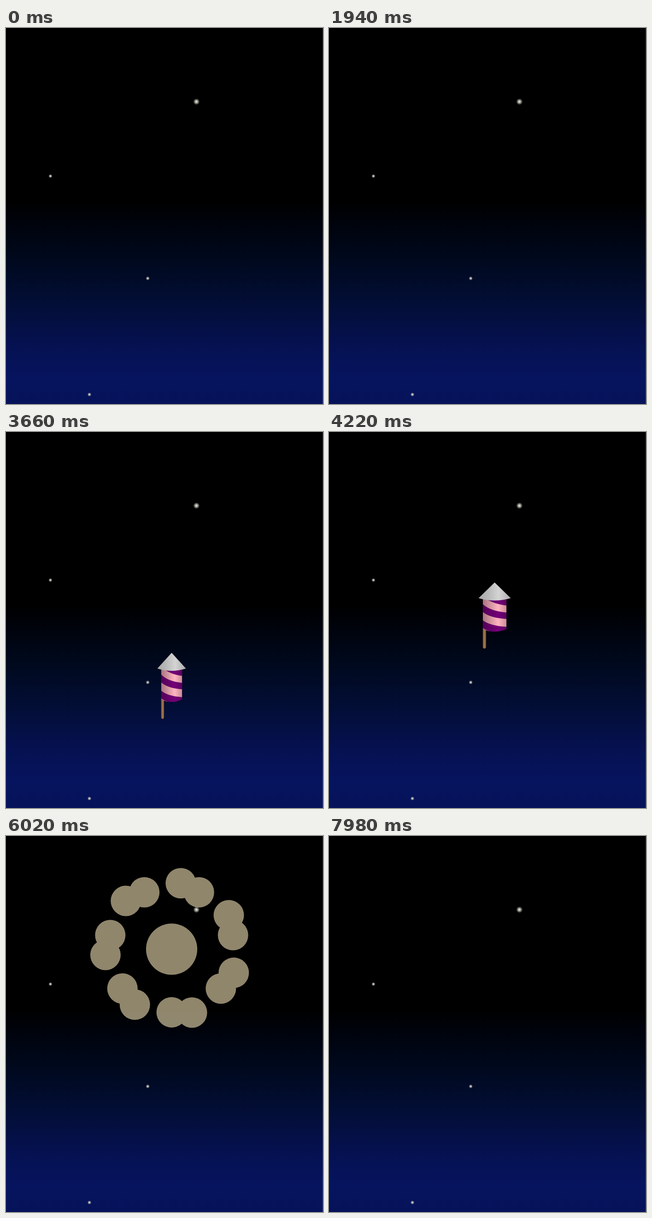
Write an HTML page that moves like this. It is 688 px wide and 814 px high and loops after 8 s.

```html
<!DOCTYPE html>
<html lang="en">
<head>
<meta charset="utf-8">
<title>Rocket at night</title>
<style>
  html, body { margin: 0; width: 100%; height: 100%; overflow: hidden; background: #000; }
  svg { display: block; width: 100%; height: 100%; }
</style>
</head>
<body>
<svg viewBox="0 0 688 814">
  <defs>
    <linearGradient id="sky" x1="0" y1="0" x2="0" y2="814" gradientUnits="userSpaceOnUse">
      <stop offset=".46" stop-color="#000"/>
      <stop offset=".52" stop-color="#00030c"/>
      <stop offset=".62" stop-color="#00091e"/>
      <stop offset=".74" stop-color="#030e38"/>
      <stop offset=".84" stop-color="#051150"/>
      <stop offset=".93" stop-color="#06145f"/>
      <stop offset="1" stop-color="#06135a"/>
    </linearGradient>
    <radialGradient id="glow">
      <stop offset="0" stop-color="#fafaf0"/>
      <stop offset=".35" stop-color="#d0d0c4" stop-opacity=".85"/>
      <stop offset=".75" stop-color="#a4a498" stop-opacity=".45"/>
      <stop offset="1" stop-color="#909088" stop-opacity="0"/>
    </radialGradient>
    <linearGradient id="cone">
      <stop offset="0" stop-color="#a8a8a8"/>
      <stop offset=".3" stop-color="#b8b8b8"/>
      <stop offset=".62" stop-color="#d4d4d4"/>
      <stop offset="1" stop-color="#acacac"/>
    </linearGradient>
    <linearGradient id="pink" x1="-27.5" x2="27.5" y1="0" y2="0" gradientUnits="userSpaceOnUse">
      <stop offset="0" stop-color="#a87480"/>
      <stop offset=".65" stop-color="#ffb4c0"/>
      <stop offset="1" stop-color="#cc8a96"/>
    </linearGradient>
    <linearGradient id="purple">
      <stop offset="0" stop-color="#540058"/>
      <stop offset=".65" stop-color="#740078"/>
      <stop offset="1" stop-color="#5c0060"/>
    </linearGradient>
    <linearGradient id="wood">
      <stop offset="0" stop-color="#80562f"/>
      <stop offset=".5" stop-color="#a8764c"/>
      <stop offset="1" stop-color="#80562f"/>
    </linearGradient>
    <path id="tube" d="M-27.5 32V101Q0 112 27.5 101V32Z"/>
    <clipPath id="inTube"><use href="#tube"/></clipPath>
  </defs>

  <rect width="688" height="814" fill="url(#sky)"/>
  <rect x="687" width="1" height="814" fill="#fff" opacity=".2"/>
  <g id="stars" fill="url(#glow)"></g>

  <g id="rocket">
    <rect x="-27.5" y="94" width="7.5" height="49" rx="3.75" fill="url(#wood)"/>
    <use href="#tube" fill="url(#purple)"/>
    <g clip-path="url(#inTube)" fill="url(#pink)">
      <path d="M-27.5 30Q-8 46 27.5 50V65Q-10 62 -27.5 47Z"/>
      <path d="M-27.5 64Q-10 77 27.5 79V96Q-10 94 -27.5 82Z"/>
      <path d="M-27.5 99Q-14 106 -2 108V115H-27.5Z"/>
    </g>
    <path d="M0 0L37.5 34Q0 44 -37.5 34Z" fill="url(#cone)"/>
  </g>

  <g id="burst" fill="#ffeec0"></g>
</svg>
<script>
  const LOOP = 8000;
  const LAUNCH = 2600, APEX = 5648;
  const BURST = 5560, BURST_LENGTH = 1060;
  const rocket = document.getElementById('rocket');
  const burst = document.getElementById('burst');

  function addCircle(parent, cx, cy, r) {
    const circle = document.createElementNS(parent.namespaceURI, 'circle');
    Object.entries({ cx, cy, r }).forEach(([key, value]) => circle.setAttribute(key, value));
    parent.append(circle);
  }

  const stars = document.getElementById('stars');
  [[413.3, 159.5, 7], [96.4, 320.6, 4.2], [307.6, 542, 4.3], [181, 793.4, 4.3]]
    .forEach(([x, y, r]) => addCircle(stars, x, y, r));

  // One large disc inside seven pairs of smaller ones.
  addCircle(burst, 0, 0, 59);
  for (let i = 0; i < 7; i++) {
    for (const [degrees, distance] of [[7.9, 153], [180 / 7, 145]]) {
      const angle = (degrees + i * 360 / 7) * Math.PI / 180;
      addCircle(burst, distance * Math.sin(angle), -distance * Math.cos(angle), 35);
    }
  }

  function show(element, visible) {
    element.setAttribute('visibility', visible ? 'visible' : 'hidden');
  }

  function draw(t) {
    const flying = t >= LAUNCH && t < BURST;
    show(rocket, flying);
    if (flying) {
      const left = APEX - t;
      const tip = 163.4 + 7.97e-5 * left ** 2;
      const halfWidth = 37.7 - 13.1 * (left / 2548) ** 2.7;
      rocket.setAttribute('transform', `translate(359.5 ${tip}) scale(${halfWidth / 37.5} 1)`);
    }

    const progress = (t - BURST) / BURST_LENGTH;
    const bursting = progress >= 0 && progress < 1;
    show(burst, bursting);
    if (bursting) {
      const size = 1 - (1 - progress) ** 5;
      burst.setAttribute('transform', `translate(359.5 245) scale(${size})`);
      burst.setAttribute('opacity', 1 - progress);
    }
  }

  const start = performance.now();
  function tick() {
    draw((performance.now() - start) % LOOP);
    requestAnimationFrame(tick);
  }
  tick();
</script>
</body>
</html>
```
